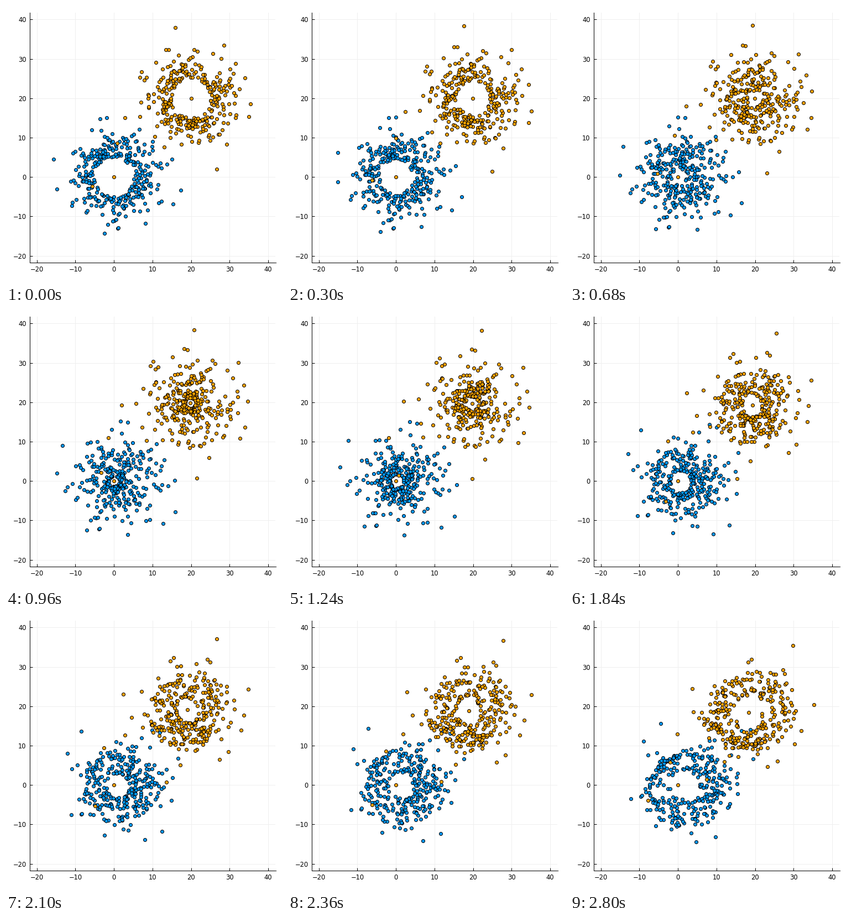
Write a matplotlib script that moves like this. It is 499 px wide and 499 px high and loops after 2820 ms.

```python
import numpy as np
import matplotlib.pyplot as plt
from matplotlib.animation import FuncAnimation

SIZE, DPI = 499, 128
PX = 72 / DPI                 # one pixel in points
TICKS, TICK_MS = 141, 20
STATES, SUB = 61, 20          # stored states, Euler steps per state
COUNT, HOLE, SPREAD = 300, 5, 3.9
GM, SPEED = 1.0, 0.25

BLUE, ORANGE = "#009afa", "#ffa500"
rng = np.random.default_rng(12)

# A few far strays; all other particles are random.
BLUE_FAR = [(-15.6, 4.5), (-14.8, -3), (-2.4, -14.3),
            (17.4, -3.4), (15.3, -6.8), (-3.6, 14.8)]
ORANGE_FAR = [(15.9, 38), (28.5, 33.4), (35, 15.4), (26.6, 2),
              (7.1, 26.7), (2.9, 15), (0.8, 8.6), (-5.6, -2.3)]


def core_a(t):
    return np.zeros(2)


def core_b(t):
    """The second core slowly falls towards the fixed one."""
    return np.full(2, 20 - 1.6 * (t / 60) ** 2)


def galaxy(center, far):
    """A disc with an empty middle, thinning out with a Gaussian tail."""
    n = COUNT - len(far)
    r = HOLE + SPREAD * np.abs(rng.standard_normal(n))
    a = rng.uniform(0, 2 * np.pi, n)
    disc = center + np.column_stack([r * np.cos(a), r * np.sin(a)])
    return np.vstack([disc, far])


def spin(pos, center):
    """Clockwise velocity of constant speed."""
    x, y = (pos - center).T
    return SPEED * np.column_stack([y, -x]) / np.hypot(x, y)[:, None]


def pull(pos, t):
    acc = np.zeros_like(pos)
    for core in (core_a, core_b):
        d = core(t) - pos
        acc += GM * d / np.hypot(*d.T)[:, None] ** 3
    return acc


def orbits(core, far):
    """Plain Euler steps; their energy gain widens the rings."""
    pos = galaxy(core(0), far)
    vel, dt, track = spin(pos, core(0)), 1 / SUB, [pos]
    for state in range(STATES - 1):
        for step in range(SUB):
            acc = pull(pos, state + step * dt)
            pos, vel = pos + vel * dt, vel + acc * dt
        track.append(pos)
    return np.array(track)


cores = np.array([[core_b(t), core_a(t)] for t in range(STATES)])
blue = orbits(core_a, BLUE_FAR)
orange = np.concatenate([orbits(core_b, ORANGE_FAR), cores], axis=1)

fig = plt.figure(figsize=(SIZE / DPI, SIZE / DPI), dpi=DPI, facecolor="white")
ax = fig.add_axes([43 / SIZE, 35 / SIZE, 444.5 / SIZE, 452.5 / SIZE])
ax.set(xlim=(-21.8, 41.91), ylim=(-21.74, 41.81),
       xticks=range(-20, 41, 10), yticks=range(-20, 41, 10))
ax.set_axisbelow(True)
ax.grid(color="#efefef", lw=PX)
ax.spines[["top", "right"]].set_visible(False)
ax.spines[["left", "bottom"]].set_linewidth(PX)
ax.tick_params(direction="in", length=5 * PX, width=PX, pad=6.5 * PX,
               labelsize=11.5 * PX, labelfontfamily="DejaVu Sans")


def dots(color):
    return ax.plot([], [], "o", ms=6 * PX, mew=PX, mec="black", mfc=color)[0]


clouds = [(dots(BLUE), blue), (dots(ORANGE), orange)]


def update(k):
    # Three pictures per seven ticks; the middle one is held.
    cycle, o = divmod(k, 7)
    n = 3 * cycle + (o > 0) + (o == 6)
    for line, track in clouds:
        line.set_data(*track[n].T)
    return [line for line, _ in clouds]


anim = FuncAnimation(fig, update, frames=TICKS, interval=TICK_MS,
                     repeat=True, repeat_delay=0)
plt.show()
```
